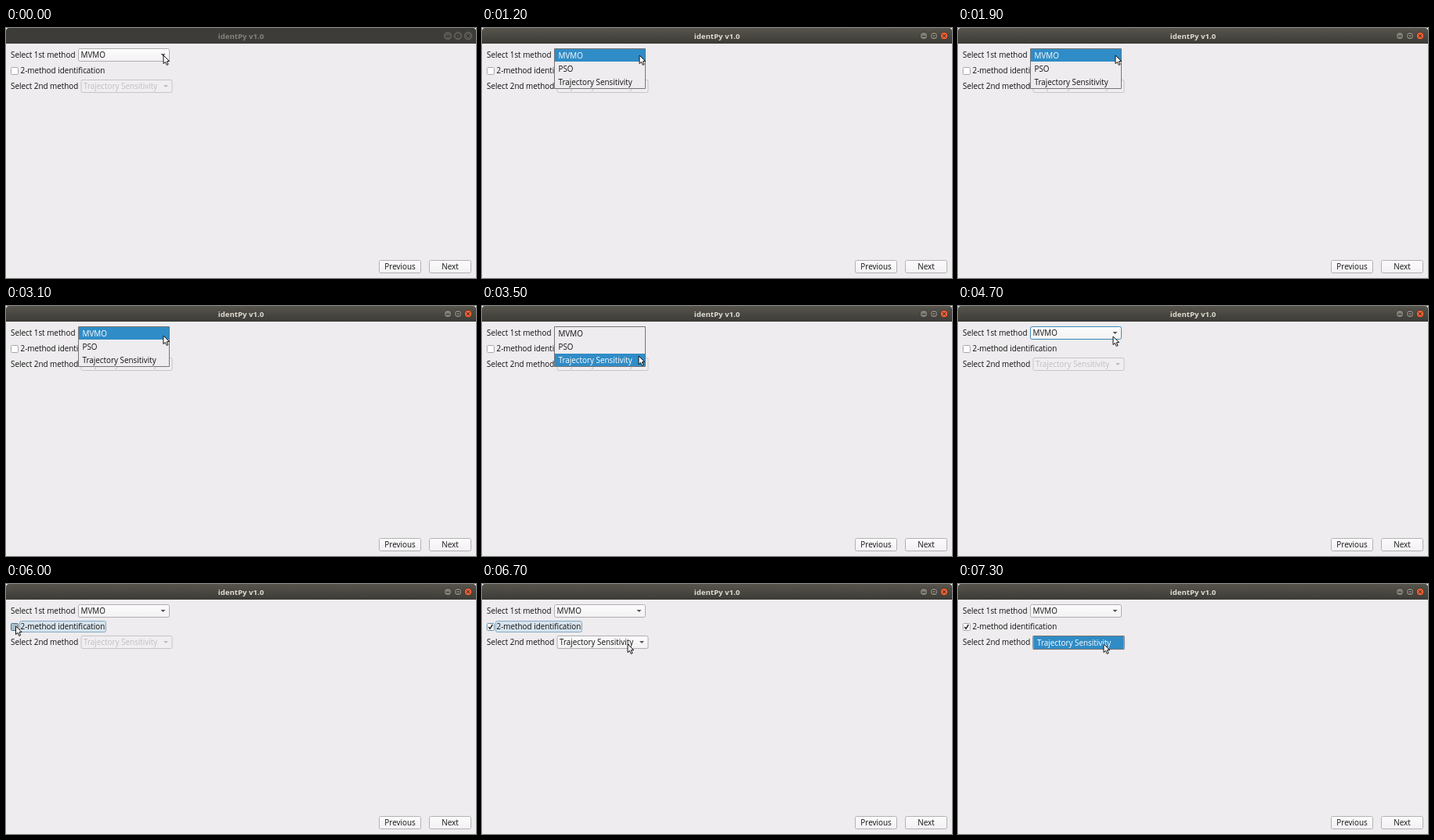
An HTML page with a canvas that plays this animation: 600 by 320 pixels, repeating every 8000 ms.

```html
<!DOCTYPE html>
<html lang="en">
<head>
<meta charset="utf-8">
<title>identPy v1.0</title>
<style>
  html, body { margin: 0; width: 100%; height: 100%; overflow: hidden; background: #fff; }
  canvas { display: block; width: 600px; height: 320px; }
</style>
</head>
<body>
<canvas id="stage" width="600" height="320"></canvas>
<script>
const ctx = document.getElementById('stage').getContext('2d');
const LOOP = 8000, STEP = 100;
const FONT = '9.9px "Open Sans", "Noto Sans", sans-serif';
const TITLE_FONT = 'bold 9.6px "Open Sans", "Noto Sans", sans-serif';
const BLUE = '#308cc6', WINDOW = '#eeecee', INK = '#111';
const METHODS = ['MVMO', 'PSO', 'Trajectory Sensitivity'];

// Moments when the interface state changes
const OPEN_FIRST = 1100, CLOSE_FIRST = 4400, PRESS = 6000, RELEASE = 6100, OPEN_SECOND = 7000;

// Pointer stops: time, x, y
const POINTER = [
  [0, 201, 35], [3000, 201, 35], [3500, 200, 64], [3800, 200, 64], [4200, 198, 40],
  [4400, 198, 39], [4800, 198, 39], [5500, 12.5, 54], [6200, 12.5, 54], [6700, 186, 77], [LOOP, 186, 77]
];

function pointerAt(t) {
  const i = POINTER.findIndex(stop => stop[0] > t);
  const [t0, x0, y0] = POINTER[i - 1], [t1, x1, y1] = POINTER[i];
  const p = (t - t0) / (t1 - t0), ease = p * p * (3 - 2 * p);
  return [x0 + (x1 - x0) * ease, y0 + (y1 - y0) * ease];
}

function text(label, x, y, color = INK, align = 'left', font = FONT) {
  ctx.font = font;
  ctx.textAlign = align;
  ctx.fillStyle = color;
  ctx.fillText(label, x, y);
}

function box(x, y, w, h, fill, border, radius = 0) {
  ctx.beginPath();
  ctx.roundRect(x + .5, y + .5, w - 1, h - 1, radius);
  ctx.fillStyle = fill;
  ctx.fill();
  ctx.strokeStyle = border;
  ctx.lineWidth = 1;
  ctx.stroke();
}

function path(points, close) {
  ctx.beginPath();
  points.forEach(([x, y]) => ctx.lineTo(x, y));
  if (close) ctx.closePath();
}

function shade(y, h, top, bottom) {
  const gradient = ctx.createLinearGradient(0, y, 0, y + h);
  gradient.addColorStop(0, top);
  gradient.addColorStop(1, bottom);
  return gradient;
}

function titleBar(active) {
  ctx.beginPath();
  ctx.roundRect(0, 0, 600, 20, [4, 4, 0, 0]);
  ctx.fillStyle = active ? shade(0, 20, '#57544c', '#3c3b37') : '#3d3c38';
  ctx.fill();
  text('identPy v1.0', 300, 13.5, active ? '#dfdbd2' : '#85827a', 'center', TITLE_FONT);
  [564, 577, 590].forEach((x, i) => {
    ctx.beginPath();
    ctx.arc(x, 10, 4.8, 0, 7);
    ctx.fillStyle = !active ? '#55534d' : i === 2 ? '#ea6035' : '#817e75';
    ctx.fill();
    ctx.strokeStyle = active ? '#33322e' : '#6c6961';
    ctx.lineWidth = .8;
    ctx.stroke();
    ctx.strokeStyle = active ? '#35332f' : '#2f2e2a';
    ctx.lineWidth = 1;
    ctx.beginPath();
    if (i === 1) ctx.rect(x - 2, 8.5, 4, 3);
    else if (i === 0) { ctx.moveTo(x - 2.5, 10.5); ctx.lineTo(x + 2.5, 10.5); }
    else for (const s of [-1, 1]) { ctx.moveTo(x - 2, 10 - 2 * s); ctx.lineTo(x + 2, 10 + 2 * s); }
    ctx.stroke();
  });
}

function button(label, x) {
  box(x, 297, 54, 17, shade(297, 17, '#fdfcfd', '#f2f0f2'), '#b3b1b3', 2);
  text(label, x + 27, 309, INK, 'center');
}

function combo(label, x, y, enabled, focused) {
  const fill = enabled ? shade(y, 17, '#fdfdfd', '#f3f1f3') : '#f0eef0';
  box(x, y, 117, 17, fill, focused ? '#3b89b8' : enabled ? '#b0aeb0' : '#c6c4c6', 2);
  text(label, x + 3.5, y + 12, enabled ? INK : '#c0bec0');
  const ax = x + 108.5, ay = y + 7;
  path([[ax - 3, ay], [ax + 3, ay], [ax, ay + 3]], true);
  ctx.fillStyle = enabled ? '#555' : '#bbb9bb';
  ctx.fill();
}

function popup(items, x, y, selected) {
  const h = items.length * 17;
  box(x, y, 117, h + 1, WINDOW, '#777577');
  items.forEach((label, i) => {
    const top = y + i * 17;
    if (i === selected) {
      ctx.fillStyle = BLUE;
      ctx.fillRect(x + 1, top + 1, 115, 16);
    }
    text(label, x + 5.5, top + 12.5, i === selected ? '#fff' : INK);
  });
}

function checkBox(pressed, checked, focused) {
  if (focused) box(17, 47, 111, 15, '#d8e3ec', '#82abc8', 2);
  box(6, 50, 10, 10, pressed ? '#a9bccb' : '#fff', pressed ? '#52748d' : focused ? '#5c91b4' : '#aaa8aa', 1);
  if (checked) {
    path([[8.3, 55], [10.2, 57.3], [13.4, 52]]);
    ctx.strokeStyle = '#222';
    ctx.lineWidth = 1.5;
    ctx.stroke();
  }
  text('2-method identification', 18.5, 58);
}

function pointer(x, y) {
  ctx.save();
  ctx.translate(x, y);
  path([[0, 0], [0, 10.6], [2.5, 8.4], [4.3, 12.4], [6.1, 11.6], [4.4, 7.7], [7.7, 7.5]], true);
  ctx.fillStyle = '#fff';
  ctx.fill();
  ctx.strokeStyle = '#111';
  ctx.lineWidth = 1;
  ctx.stroke();
  ctx.restore();
}

function draw(t) {
  const [x, y] = pointerAt(t);
  const firstOpen = t >= OPEN_FIRST && t < CLOSE_FIRST;
  const checked = t >= RELEASE;

  ctx.clearRect(0, 0, 600, 320);
  ctx.fillStyle = WINDOW;
  ctx.fillRect(0, 20, 600, 300);
  titleBar(t >= OPEN_FIRST);

  text('Select 1st method', 6, 38);
  combo(METHODS[0], 92, 26, true, t >= OPEN_FIRST && t < PRESS);
  checkBox(t >= PRESS && t < RELEASE, checked, t >= PRESS && t < OPEN_SECOND);
  text('Select 2nd method', 6, 78);
  combo(METHODS[2], 95.5, 66, checked, t >= OPEN_SECOND);
  button('Previous', 476);
  button('Next', 540);

  if (firstOpen) popup(METHODS, 92, 26, Math.min(2, Math.max(0, Math.floor((y - 26) / 17))));
  if (t >= OPEN_SECOND) popup([METHODS[2]], 95.5, 66, 0);
  pointer(x, y);
}

function tick() {
  const t = performance.now() % LOOP;
  draw(Math.floor(t / STEP) * STEP);
  requestAnimationFrame(tick);
}
tick();
</script>
</body>
</html>
```
